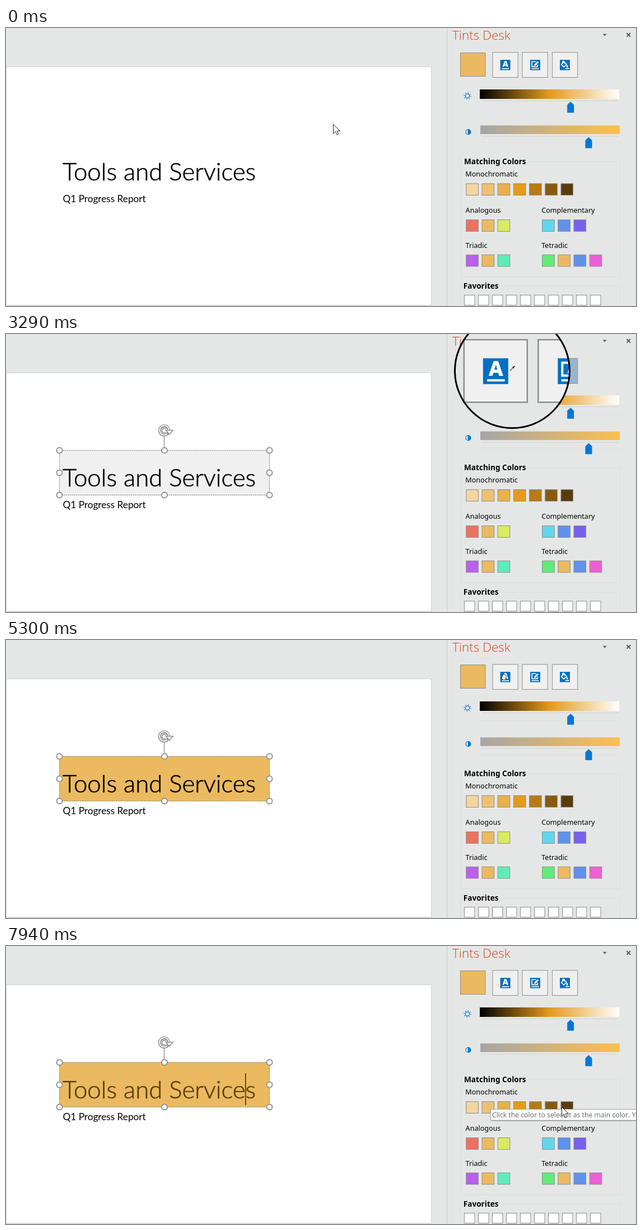
An HTML page that plays this animation: 1125 px wide and 498 px high, repeating every 7990 ms.

```html
<!DOCTYPE html>
<html lang="en">
<head>
<meta charset="utf-8">
<title>Picking slide colours</title>
<style>
html, body { margin: 0; width: 100%; height: 100%; overflow: hidden; background: #e5e7e6; }
svg { display: block; width: 100%; height: 100%; }
.title { font: 300 43.8px Lato, sans-serif; fill: currentColor; stroke: currentColor; stroke-width: .6; }
.subtitle { font: 17.2px Lato, sans-serif; }
.heading { font: 300 22.5px "Open Sans", sans-serif; fill: #d5431f; }
.label { font: 12.6px "Noto Sans", sans-serif; }
.group { font: 700 13.6px "Noto Sans", sans-serif; }
.tip { font: 12.25px "Open Sans", sans-serif; fill: #666; }
</style>
</head>
<body>
<svg viewBox="0 0 1125 498" preserveAspectRatio="none">
  <defs>
    <linearGradient id="light"><stop offset="0" stop-color="#000"/><stop offset=".5" stop-color="#e49a1c"/><stop offset="1" stop-color="#fff"/></linearGradient>
    <linearGradient id="vivid"><stop offset="0" stop-color="#a6a6a6"/><stop offset="1" stop-color="#fdbf50"/></linearGradient>
    <clipPath id="lens"><circle r="102.5"/></clipPath>
  </defs>

  <g id="scene">
    <rect width="1125" height="498" fill="#e5e7e6"/>
    <rect x=".5" y="69.5" width="759" height="427" fill="#fff" stroke="#cfd1d0"/>
    <path d="M787.5 0V498" stroke="#c9cbca"/>

    <g id="selection">
      <rect id="box" x="95.5" y="208.5" width="375" height="80" stroke="#6e6e6e" stroke-dasharray="2 1.4"/>
      <path d="M282.5 203V183" stroke="#929292" stroke-width="1.4"/>
      <g fill="none" stroke="#929292">
        <circle cx="282.5" cy="172.8" r="8.2" stroke-width="5.2"/>
        <path d="M291 172A8.4 8.4 0 1 0 288 179" stroke="#fff" stroke-width="1.8"/>
        <path d="M285.5 172.5H298L291.7 179.5Z" fill="#fff" stroke-width="1.6"/>
        <path d="M286 171A4 4 0 1 0 285 176" stroke-width="1.6"/>
      </g>
      <g id="handles" fill="#fff" stroke="#929292" stroke-width="2"></g>
    </g>
    <text id="title" class="title" x="101" y="273">Tools and Services</text>
    <text class="subtitle" x="101.5" y="312">Q1 Progress Report</text>
    <path id="caret" d="M427.8 228V285" stroke="#111" stroke-width="1.3"/>

    <text class="heading" x="797" y="21">Tints Desk</text>
    <path d="M1065.5 10.5H1073L1069.2 14.5Z" fill="#666"/>
    <path d="M1108.3 9L1115 15.6M1115 9L1108.3 15.6" stroke="#555" stroke-width="1.8"/>

    <g fill="none" stroke="#dcdedd">
      <path d="M816 239.5H812.5V445.5H1096.5V239.5H931M816 462.5H811.5V498M883 462.5H1096.5V498"/>
    </g>
    <g id="patches"></g>
    <g id="icons"></g>

    <g fill="none" stroke="#0e76c8" stroke-width="1.3">
      <circle cx="824" cy="121.8" r="3.6"/>
      <circle cx="824" cy="121.8" r="5.7" stroke-width="1.8" stroke-dasharray="1.3 3.18"/>
      <circle cx="825.4" cy="186.3" r="4.4"/>
      <path d="M825.4 182A4.3 4.3 0 0 1 825.4 190.6Z" fill="#0e76c8"/>
    </g>
    <g id="sliders"></g>
    <g id="labels"></g>
    <g id="tips"></g>
  </g>

  <g id="magnifier">
    <g clip-path="url(#lens)"><use id="zoomed" href="#scene"/></g>
    <circle r="102.5" fill="none" stroke="#000" stroke-width="3"/>
  </g>

  <g id="cursor">
    <path id="arrow" d="M.5 .5V17L4.4 13.4 7.1 19.5 9.7 18.3 7.1 12.4H12.3Z" fill="#fff" stroke="#222"/>
    <path id="ibeam" d="M-3.5 -8.5H-1L0 -7.5 1 -8.5H3.5M0 -7.5V7.5M-3.5 8.5H-1L0 7.5 1 8.5H3.5" fill="none" stroke="#222"/>
    <path id="hand" d="M-2 5.5L-4.6 1.2Q-4.8 -.6 -3 .6L-2.8 -3.4Q-2 -4.8 -1.2 -3.4Q-.2 -5.6 .7 -3.6Q1.8 -4.8 2.5 -2.8Q4.2 -3.4 4.3 -1.2L3.4 3 2.8 5.5Z" fill="#fff" stroke="#222" stroke-width=".9"/>
    <g id="dropper" stroke="#222">
      <path d="M.4 -.4L1 -2.2 5 -6.2 6.2 -5 2.2 -1Z" fill="#fff" stroke-width=".8"/>
      <path d="M4.6 -7.4L7.4 -4.6" stroke-width="1.2"/>
      <path d="M6.4 -6.4L7.8 -7.8" stroke-width="2" stroke-linecap="round"/>
    </g>
  </g>
</svg>

<script>
const LOOP = 7990, ZOOM = 2.5;
const GREY = '#e5e7e6', MAIN = '#ebba60', BUTTON = '#f0f0f0', PRESSED = '#9ab3d1';
const BLUE = '#0070c4';
const FILL_DRAG = { press: 2590, move: 2820, drop: 4230 };
const TEXT_DRAG = { press: 5330, move: 5580, drop: 7440 };

const $ = id => document.getElementById(id);
function add(parent, tag, attrs, text) {
  const el = document.createElementNS('http://www.w3.org/2000/svg', tag);
  for (const key in attrs) el.setAttribute(key, attrs[key]);
  if (text) el.textContent = text;
  return parent.appendChild(el);
}

// Coloured areas are kept so the dropper can read them.
const patches = [];
function patch(x, y, width, height, color, stroke = '#8d8d8d') {
  const el = add($('patches'), 'rect', { x, y, width, height, fill: color, stroke });
  const item = { x, y, width, height, color, el };
  patches.push(item);
  return item;
}
function swatches(x, y, colors) {
  colors.forEach((c, i) => patch(x + i * 28.2, y, 21.6, 20.7, c));
}

patch(811.5, 44.5, 44.5, 42, MAIN);
const [textButton, , fillButton] = [869, 922, 975.5].map(x => patch(x, 43.7, 45.2, 44.8, BUTTON));
const lightBar = patch(846, 110, 249, 17, 'url(#light)', 'none');
const vividBar = patch(847, 174.5, 249, 15.5, 'url(#vivid)', 'none');
lightBar.stops = [[0, 0, 0], [228, 154, 28], [255, 255, 255]];
vividBar.stops = [[166, 166, 166], [253, 191, 80]];
swatches(821.8, 278.8, ['#f3d69f', '#eec172', '#e9b04b', '#e49a1c', '#b67b16', '#865a10', '#5a3c0b']);
swatches(821.8, 343.6, ['#ec7260', MAIN, '#d9eb60']);
swatches(957.6, 343.6, ['#60d7ec', '#6091ec', '#7760ec']);
swatches(821.8, 406.3, ['#ba60ec', MAIN, '#60ecba']);
swatches(957.6, 406.3, ['#60ec77', MAIN, '#6091ec', '#ec60d5']);
for (let i = 0; i < 10; i++) patch(818.5 + 25 * i, 478.5, 18.5, 18, '#fff');

const line = (x, w) => `M${x} 15.8H${x + w}`;
[
  [882.6, 'M4 12.6L7.6 2H10.8L14.4 12.6H11.5L10.8 10.4H7.4L6.7 12.6ZM8.1 8.2H10.2L9.2 4.6Z', line(3, 12.5)],
  [936, 'M7 10.8L7.6 8.2 13 2.6 15.2 4.8 9.7 10.3Z', 'M10 3.2H3.2V12.4H13.2V8.5' + line(2.5, 13)],
  [989, 'M12.6 8.6Q15.6 11.5 13.6 14.2L11.5 12Z', 'M2.6 8.4L7.4 3.4 12 8 7.2 12.8ZM5 5.5V3Q6.5 1.4 8 3.2V6.5M10 15.6H16.5']
].forEach(([x, solid, outline]) => {
  const g = add($('icons'), 'g', { transform: `translate(${x} 57)` });
  add(g, 'rect', { width: 18, height: 18.5, fill: BLUE });
  add(g, 'path', { d: solid, fill: '#fff', 'fill-rule': 'evenodd' });
  add(g, 'path', { d: outline, fill: 'none', stroke: '#fff', 'stroke-width': 1.6 });
});

[[1008.2, 131], [1040.5, 194.5]].forEach(([x, y]) => {
  const g = $('sliders');
  add(g, 'path', { d: `M850 ${y - .5}H1094`, stroke: '#bfc1c0', 'stroke-dasharray': '.8 .6' });
  add(g, 'rect', { x: 845.5, y: y + 10, width: 251, height: 3, fill: '#e9ebea', stroke: '#d9dbda', 'stroke-width': .8 });
  add(g, 'path', { d: `M${x} ${y + 1}l6 5.6v14.2h-12v-14.2Z`, fill: '#0078d4' });
});

[['group', 818, 244, 'Matching Colors'], ['label', 820.3, 266, 'Monochromatic'],
 ['label', 820.6, 331, 'Analogous'], ['label', 956.2, 331, 'Complementary'],
 ['label', 820.6, 393.5, 'Triadic'], ['label', 956.2, 393.5, 'Tetradic'],
 ['group', 816.8, 467, 'Favorites']
].forEach(([c, x, y, text]) => add($('labels'), 'text', { class: c, x, y }, text));

for (const x of [95.5, 283, 470.5])
  for (const y of [208.5, 248.5, 288.5])
    if (x !== 283 || y !== 248.5) add($('handles'), 'circle', { cx: x, cy: y, r: 5 });

function tooltip(x, y, width, lines, from, full, until) {
  const el = add($('tips'), 'g', {});
  const height = lines.length * 16.7 + 3;
  add(el, 'rect', { x: x + 2, y: y + 2, width, height, fill: '#0005' });
  add(el, 'rect', { x: x + .5, y: y + .5, width, height, fill: '#fff', stroke: '#a0a0a0' });
  lines.forEach((s, i) => add(el, 'text', { class: 'tip', x: x + 3, y: y + 14.5 + 16.7 * i }, s));
  return { el, from, full, until };
}
const drag = ['Drag the button to pick a color,', 'or click it to choose one from the Color dialog'];
const tips = [
  tooltip(1006, 72, 266, ['Change the fill color.', ...drag], 2160, 2530, 2580),
  tooltip(840, 67, 266, ['Choose the main color.', ...drag], 4380, 4600, 4680),
  tooltip(891, 72, 266, ['Change the text color.', ...drag], 4840, 5010, 5280),
  tooltip(865, 292, 420, ['Click the color to select it as the main color. You can drag it to another place.'], 7690, 7900, LOOP)
];

// Pointer route: time, x, y
const route = [
  [0, 584, 172], [340, 584, 172], [490, 575, 204], [850, 575, 204], [1230, 421, 247],
  [1450, 421, 247], [1900, 1008, 65], [1980, 1003, 66], [2820, 1003, 66], [3050, 968, 66],
  [3250, 904, 66], [3275, 903.7, 66], [3290, 900, 66], [3600, 873, 65], [3650, 872, 65],
  [4050, 840, 63], [4680, 840, 63], [4840, 888, 66], [5580, 890, 66], [5780, 897, 100],
  [5870, 909, 143], [5895, 913, 172], [5910, 917, 174.5], [6100, 930, 205], [6340, 950, 244],
  [6390, 950, 244], [6560, 987, 272], [6585, 986.6, 271.8], [6600, 988, 272],
  [6850, 1010, 287], [7050, 1003, 288], [7440, 1003, 288], [7680, 992, 288], [LOOP, 992, 288]
];
const carets = [[1420, 1930], [2300, 2590], [4260, 4790], [4970, 5300], [7470, LOOP]];

const within = (t, [a, b]) => t >= a && t < b;
const mix = (a, b, k) => a + (b - a) * k;
const inside = ([px, py], r) => px >= r.x && px <= r.x + r.width && py >= r.y && py <= r.y + r.height;

function pointer(t) {
  const i = Math.max(1, route.findIndex(p => p[0] >= t));
  const a = route[i - 1], b = route[i];
  const k = Math.max(0, (t - a[0]) / (b[0] - a[0]));
  return [mix(a[1], b[1], k), mix(a[2], b[2], k)];
}

function gradientColor(stops, k) {
  const s = Math.min(k * (stops.length - 1), stops.length - 1.001), i = Math.floor(s);
  return `rgb(${stops[i].map((v, j) => Math.round(mix(v, stops[i + 1][j], s - i)))})`;
}

function pick(p, pressed) {
  const hit = patches.find(r => inside(p, r));
  if (!hit) return GREY;
  if (hit.stops) return gradientColor(hit.stops, (p[0] - hit.x) / hit.width);
  return hit === pressed ? PRESSED : hit.color;
}

// The preview follows the dropper and stays after the drop.
function preview(t, { move, drop }, before, button) {
  return t < move ? before : pick(pointer(Math.min(t, drop - 20) - 15), button);
}

const textBox = { x: 95, y: 208, width: 375, height: 80 };
const buttonRow = { x: 811, y: 43, width: 210, height: 45 };
const show = (id, on) => $(id).setAttribute('visibility', on ? 'visible' : 'hidden');

function draw(t) {
  const pos = pointer(t);
  const filling = within(t, [FILL_DRAG.press, FILL_DRAG.drop]);
  const coloring = within(t, [TEXT_DRAG.press, TEXT_DRAG.drop]);
  const dragging = filling || coloring;

  show('selection', t >= 1420);
  show('caret', carets.some(c => within(t, c)));
  $('box').setAttribute('fill', preview(t, FILL_DRAG, 'none', fillButton));
  $('title').setAttribute('color', preview(t, TEXT_DRAG, '#000', textButton));
  fillButton.el.setAttribute('fill', filling ? PRESSED : BUTTON);
  textButton.el.setAttribute('fill', coloring ? PRESSED : BUTTON);

  for (const { el, from, full, until } of tips) {
    const alpha = within(t, [from, until]) ? Math.min(1, (t - from) / (full - from)) : 0;
    el.setAttribute('opacity', alpha);
  }

  // The lens trails the dropper, its picture a little less.
  show('magnifier', dragging);
  if (dragging) {
    const [fx, fy] = pointer(t - 15);
    $('magnifier').setAttribute('transform', `translate(${pointer(t - 40)})`);
    $('zoomed').setAttribute('transform', `scale(${ZOOM}) translate(${-fx} ${-fy})`);
  }

  const kind = dragging ? 'dropper' : inside(pos, textBox) ? 'ibeam' : inside(pos, buttonRow) ? 'hand' : 'arrow';
  for (const id of ['arrow', 'ibeam', 'hand', 'dropper']) show(id, id === kind);
  $('cursor').setAttribute('transform', `translate(${pos})`);
}

function tick() {
  draw(performance.now() % LOOP);
  requestAnimationFrame(tick);
}
tick();
</script>
</body>
</html>
```
